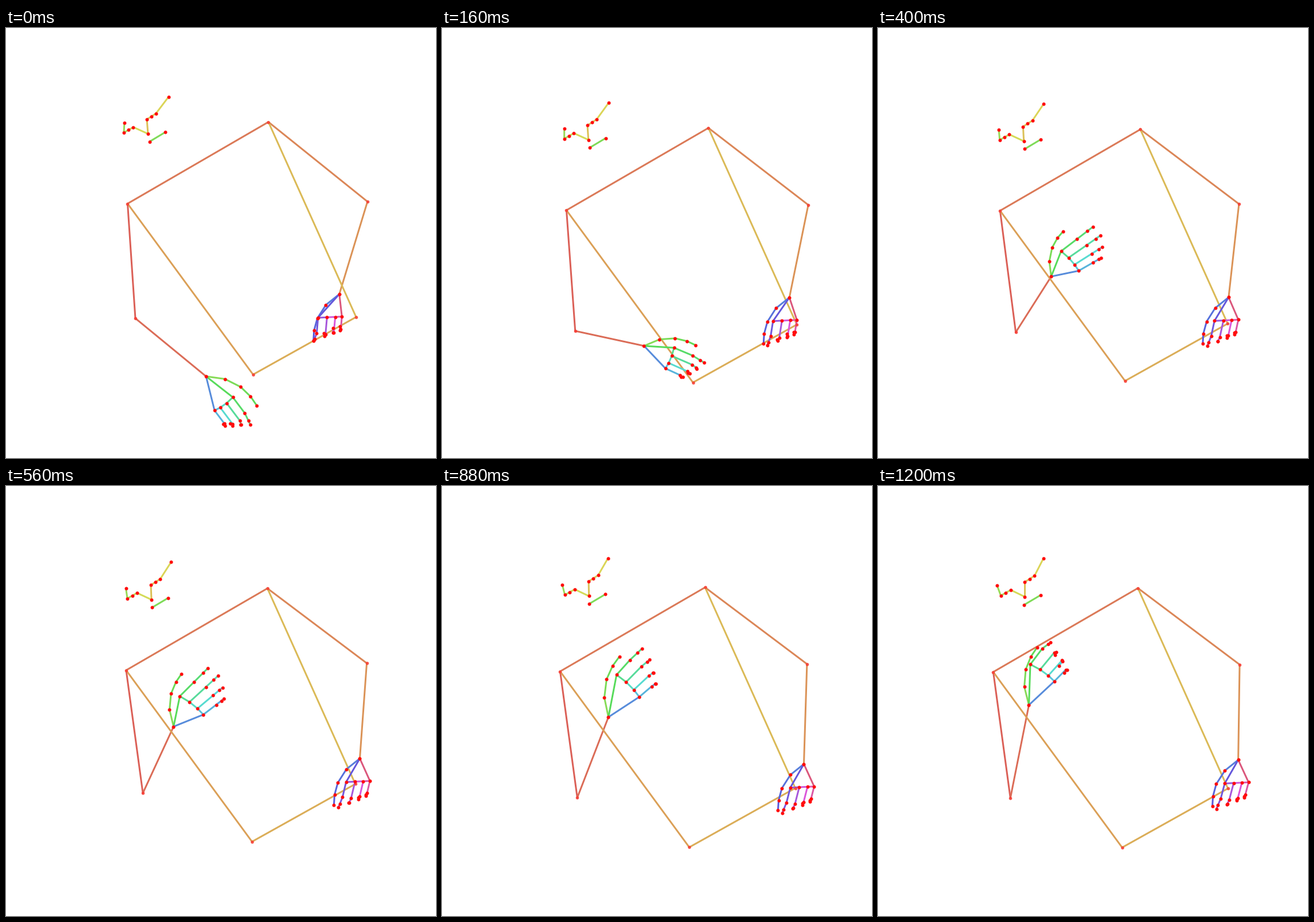
Animation, 748 px wide and 748 px high, one loop 1.28 s. Source, as a matplotlib script:

```python
import colorsys

import numpy as np
import matplotlib.pyplot as plt
from matplotlib.animation import FuncAnimation
from matplotlib.collections import LineCollection

SIZE, DPI = 748, 100
FRAMES, STEP_MS = 16, 80
PX = 72 / DPI

# frame: shoulder x, y, body zoom | waving wrist x, y, finger angle, size, curl
POSES = {
    0: (211.5, 305.5, 1.000, 348, 606, 53, 1.02, .75),
    1: (209, 307, 1.035, 352, 609, 53, 1.02, .75),
    2: (216.5, 317, 1.008, 351.5, 553, 23.5, .90, .60),
    4: (214, 317, .997, 312.5, 455.5, -23, .80, .10),
    7: (209, 320.5, 1.003, 291.5, 418.5, -42, .93, 0),
    9: (207, 323.5, 1.024, 290, 412, -47, 1.08, .30),
    11: (205.5, 322.5, 1.029, 289.5, 402, -45, 1.07, .35),
    15: (200.5, 323.5, 1.027, 262.5, 381, -50, 1.01, 1),
}
KEYS = np.array(list(POSES), float)
VALUES = np.array(list(POSES.values()))
SLOPES = np.gradient(VALUES, KEYS, axis=0)


def key_pose(t):
    """Cubic Hermite curve through the key poses."""
    i = min(np.searchsorted(KEYS, t, "right") - 1, len(KEYS) - 2)
    h = KEYS[i + 1] - KEYS[i]
    u = (t - KEYS[i]) / h
    a, b = VALUES[i:i + 2]
    ma, mb = SLOPES[i:i + 2] * h
    blend = u * u * (3 - 2 * u)
    return a + blend * (b - a) + u * (1 - u) * ((1 - u) * ma - u * mb)


def ease(t, start, end):
    u = np.clip((t - start) / (end - start), 0, 1)
    return u * u * (3 - 2 * u)


def polar(angle, length):
    a = np.radians(angle)
    return length * np.array([np.cos(a), np.sin(a)])


def normal(v):
    return np.array([v[1], -v[0]])


def build_finger(knuckle, angle, length, reach, twist):
    """Four joints; a curled finger pushes its upper joint outwards."""
    axis = polar(angle, 1)
    joint = length * axis
    bend = polar(angle + twist, length * reach) - joint
    bulge = max(0, 4 - .2 * bend @ axis)
    upper = joint + .65 * bend + bulge * axis
    return [knuckle, knuckle + joint, knuckle + upper, knuckle + joint + bend]


def build_hand(wrist, thumb, first, last, angle, length, curl, fan=0, arch=0, side=1):
    points = [np.zeros(2)]
    for u in (.3, .6, .83, 1):
        points.append(u * thumb + side * .58 * u * (1 - u) * normal(thumb))
    row = last - first
    straight = (2, 1.75, 1.6, 1.6)
    folding = (.5, .8, .9, .8)
    sizes = (.9, 1, .92, .73)
    for i, u in enumerate((0, .375, .72, 1)):
        knuckle = first + u * row + arch * 4 * u * (1 - u) * normal(row)
        points += build_finger(knuckle, angle + fan * (i - 1.2), length * sizes[i],
                               straight[i] - curl * folding[i], 6 * curl)
    return wrist + np.array(points)


def build_trunk(t, origin, zoom):
    """Both shoulders, elbows, hips and the resting wrist."""
    settle = 1 - np.exp(-t / 2)
    shape = np.array([(0, 0), (13.5 + 15.5 * ease(t, 1, 6), 199.5 + 14 * settle),
                      (245, -142), (417.3, -3.5 - 9 * settle),
                      (218.3, 297.3), (397.5, 197.3)])
    shoulder_a, elbow_a, shoulder_b, elbow_b, hip_a, hip_b = origin + zoom * shape
    wrist_b = elbow_b + (-49 * np.exp(-t / 5), 161 + 13 * np.exp(-((t - 11) / 4)**2))
    return shoulder_a, elbow_a, shoulder_b, elbow_b, wrist_b, hip_a, hip_b


def build_face(t, origin, zoom):
    nose = origin + (zoom * (35.5 + 1.2 * t), -121.5 * zoom - 6 * ease(t, 6, 10))
    eye_a = np.linspace((-42, -2), (-25.5, -11.5), 3)
    eye_b = np.linspace((-2, -25), (14, -35.5), 3)
    face = np.vstack([(-41, -19.5), eye_a, (0, 0), eye_b, (36, -64.5), (3, 13.5), (30.5, -3)])
    turn = t / 15
    depth = np.zeros(len(face))
    depth[[0, 8]] = -9
    depth[9:] = -3
    x, y = face.T
    return nose + np.column_stack([x + turn * (depth - .08 * y), y * (1 + .03 * turn)])


def build_waving_hand(t, wrist, angle, size, curl):
    rise, opened, late = ease(t, 1, 4), ease(t, 7, 9), ease(t, 4, 15)
    thumb = polar(angle - 23 - 18 * rise**2 + 9 * late, 100 * size)
    first = polar(angle - 15 - 19 * rise + 9 * opened - 13 * late,
                  (58 + 12 * opened) * size)
    last = polar(angle + 23 - 16 * late, 60 * size)
    return build_hand(wrist, thumb, first, last, angle, 38.5, curl, fan=2.5 * rise, arch=.05)


def build_resting_hand(t, wrist):
    shift = np.array([-13.5 * np.exp(-t / 2), 0])
    return build_hand(wrist, np.array([-45, 80.5]), shift + (-23.5, 41), shift + (18, 39),
                      105 - 10 * np.exp(-t / 4), 30, .55 + .45 * np.exp(-t / 3), side=-1)


def pose(t):
    x, y, zoom, wrist_x, wrist_y, angle, size, curl = key_pose(t)
    origin = np.array([x, y])
    wrist_a = np.array([wrist_x, wrist_y])
    sa, ea, sb, eb, wrist_b, ha, hb = build_trunk(t, origin, zoom)
    return (np.array([sa, ea, wrist_a, sb, eb, wrist_b, ha, hb]),
            build_face(t, origin, zoom),
            build_waving_hand(t, wrist_a, angle, size, curl),
            build_resting_hand(t, wrist_b))


def hand_edges():
    edges = [(i, i + 1) for i in range(4)] + [(0, 5)]
    for k in range(5, 21, 4):
        edges += [(j, j + 1) for j in range(k, k + 3)]
        edges.append((k, k + 4) if k < 17 else (0, k))
    return edges


TRUNK_EDGES = [(0, 1), (1, 2), (0, 3), (3, 4), (4, 5), (0, 6), (6, 7), (7, 3)]
FACE_EDGES = [(4, 5), (5, 6), (6, 7), (7, 8), (4, 3), (3, 2), (2, 1), (1, 0), (9, 10)]
EDGES = [TRUNK_EDGES, FACE_EDGES, hand_edges(), hand_edges()]
hues = np.concatenate([np.linspace(4, 45, 8), 48 + 54 * np.linspace(0, 1, 9)**1.8,
                       np.linspace(98, 216, 21), np.linspace(222, 343, 21)])

fig = plt.figure(figsize=(SIZE / DPI, SIZE / DPI), dpi=DPI, facecolor="white")
ax = fig.add_axes([0, 0, 1, 1])
ax.set_xlim(0, SIZE)
ax.set_ylim(SIZE, 0)
ax.axis("off")

bones = LineCollection([], colors=[colorsys.hls_to_rgb(h / 360, .6, .65) for h in hues],
                       linewidths=3 * PX, capstyle="round", zorder=1)
ax.add_collection(bones)
dot = dict(marker="o", linestyle="none", markeredgewidth=0)
trunk_dots, = ax.plot([], [], color="#f83a33", alpha=.85, markersize=5.6 * PX, zorder=2, **dot)
small_dots, = ax.plot([], [], color="#ff0d0d", markersize=6 * PX, zorder=3, **dot)


def draw(frame):
    parts = pose(frame)
    bones.set_segments([(p[a], p[b]) for p, edges in zip(parts, EDGES) for a, b in edges])
    trunk_dots.set_data(*parts[0].T)
    small_dots.set_data(*np.vstack(parts[1:]).T)
    return bones, trunk_dots, small_dots


anim = FuncAnimation(fig, draw, frames=FRAMES, interval=STEP_MS, repeat=True, repeat_delay=0)
plt.show()
```
